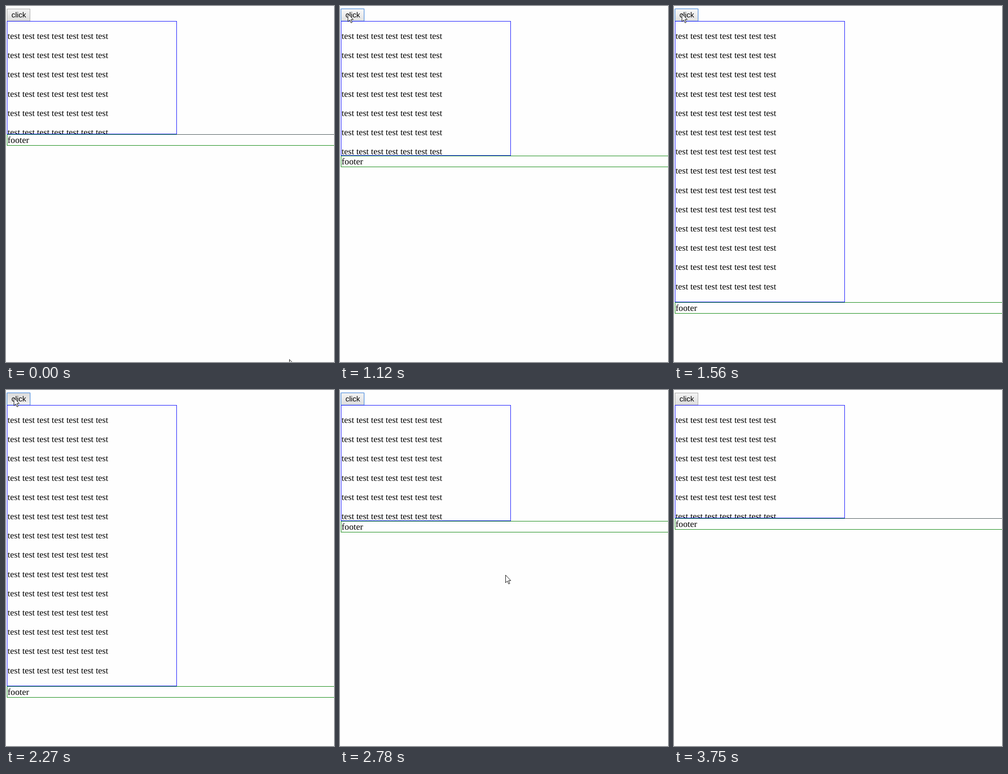
Recreate the animation shown at these times as an HTML page. Size 718x780 px, loop 3920 ms.

```html
<!DOCTYPE html>
<html lang="en">
<head>
<meta charset="utf-8">
<title>Expanding box</title>
<style>
  html, body { margin: 0; width: 100%; height: 100%; overflow: hidden; background: #fefefe; }
  svg { display: block; width: 718px; height: 780px; }
  text { font: 19.63px "Liberation Serif", "Times New Roman", serif; text-rendering: geometricPrecision; }
  .label { font: 16.36px "Liberation Sans", Arial, sans-serif; }
  .line { fill: none; stroke-width: 1; }
  #ring { fill: none; stroke: #b4cff3; }
  #face { fill: url(#idle); stroke: #a2a2a2; }
  #button.hover #face { fill: url(#lit); stroke: #707070; }
  #button.focus #face { stroke: #5b94dc; }
  #button.down #face { fill: url(#pressed); }
  #button:not(.focus) #ring { display: none; }
</style>
</head>
<body>
<svg viewBox="0 0 718 780">
  <defs>
    <linearGradient id="idle" x2="0" y2="1">
      <stop offset="0" stop-color="#f3f3f3"/><stop offset=".4" stop-color="#ececec"/><stop offset="1" stop-color="#dcdcdc"/>
    </linearGradient>
    <linearGradient id="lit" x2="0" y2="1">
      <stop offset="0" stop-color="#f8f8f8"/><stop offset=".4" stop-color="#f0f0f0"/><stop offset="1" stop-color="#dfdfdf"/>
    </linearGradient>
    <linearGradient id="pressed" x2="0" y2="1">
      <stop offset="0" stop-color="#dcdcdc"/><stop offset="1" stop-color="#f1f1f1"/>
    </linearGradient>
    <clipPath id="clip"><rect id="window" x="2" y="34" width="372"/></clipPath>
  </defs>
  <g id="button">
    <rect id="ring" x="1.5" y="5.5" width="52" height="28" rx="1"/>
    <rect id="face" x="2.5" y="6.5" width="50" height="26.5"/>
    <text class="label" x="12" y="25">click</text>
  </g>
  <g id="rows" clip-path="url(#clip)"></g>
  <g id="footer">
    <rect class="line" x="2.5" y=".5" width="720" height="24" stroke="#008000"/>
    <path id="seam" class="line" d="M374 .5H718" stroke="#3d4a4d"/>
    <text x="3.6" y="18.8">footer</text>
  </g>
  <rect id="box" class="line" x="2.5" y="33.5" width="371" stroke="#0000ff"/>
  <path id="cursor" d="M.5 .5V17.3L4.4 13.6L7.2 20L9.7 18.9L7 12.7H12Z" fill="#fff" stroke="#000"/>
</svg>
<script>
const LOOP = 3920, STEP = 73, SLIDE = 460, CLOSED = 280, OPEN = 648;
const $ = id => document.getElementById(id);
const mix = (a, b, k) => a + (b - a) * k;

const rows = $("rows");
for (let i = 0; i < 14; i++) {
  const row = document.createElementNS("http://www.w3.org/2000/svg", "text");
  row.textContent = Array(7).fill("test").join(" ");
  row.setAttribute("x", 3.6);
  row.setAttribute("y", 71.9 + i * 42.2);
  rows.append(row);
}

// cubic-bezier(.25, .1, .25, 1)
function ease(x) {
  if (x <= 0) return 0;
  if (x >= 1) return 1;
  const curve = (u, a, b) => 3 * u * (1 - u) ** 2 * a + 3 * u * u * (1 - u) * b + u ** 3;
  let lo = 0, hi = 1;
  for (let i = 0; i < 24; i++) {
    const mid = (lo + hi) / 2;
    if (curve(mid, .25, .25) < x) lo = mid; else hi = mid;
  }
  return curve(lo, .1, 1);
}

// the screen refreshes in steps, counted from the start of each burst
function snap(time) {
  const start = [2410, 1120, 60].find(s => s <= time);
  return start ? start + Math.floor((time - start) / STEP) * STEP : 0;
}

// pointer: sweep in, settle on the button, sweep out along a slight bow
function pointer(t) {
  const enter = ease(t / 540), settle = ease((t - 590) / 235), leave = ease((t - 2560) / 721);
  if (leave > 0) {
    const bow = 370 * leave * (1 - leave) ** 2;
    return [mix(17, 606, leave) + bow, mix(17, 780, leave)];
  }
  return [mix(620, 16, enter) + settle, mix(774, 31.5, enter) - 14.5 * settle];
}

function draw(time) {
  const t = snap(time);
  const within = (a, b) => time >= a && time < b;

  const amount = ease((t - 1065) / SLIDE) - ease((t - 2391) / SLIDE);
  const bottom = Math.round(mix(CLOSED, OPEN, amount));
  $("box").setAttribute("height", bottom - 33);
  $("window").setAttribute("height", bottom - 34);
  $("footer").setAttribute("transform", `translate(0 ${bottom + 1})`);
  $("seam").style.display = bottom === CLOSED ? "" : "none";

  const state = $("button").classList;
  state.toggle("hover", within(530, 2620));
  state.toggle("focus", within(890, 3750));
  state.toggle("down", within(890, 1120) || within(2270, 2410));

  $("cursor").setAttribute("transform", `translate(${pointer(t).map(Math.floor)})`);
}

function frame() {
  draw(performance.now() % LOOP);
  requestAnimationFrame(frame);
}
frame();
</script>
</body>
</html>
```
